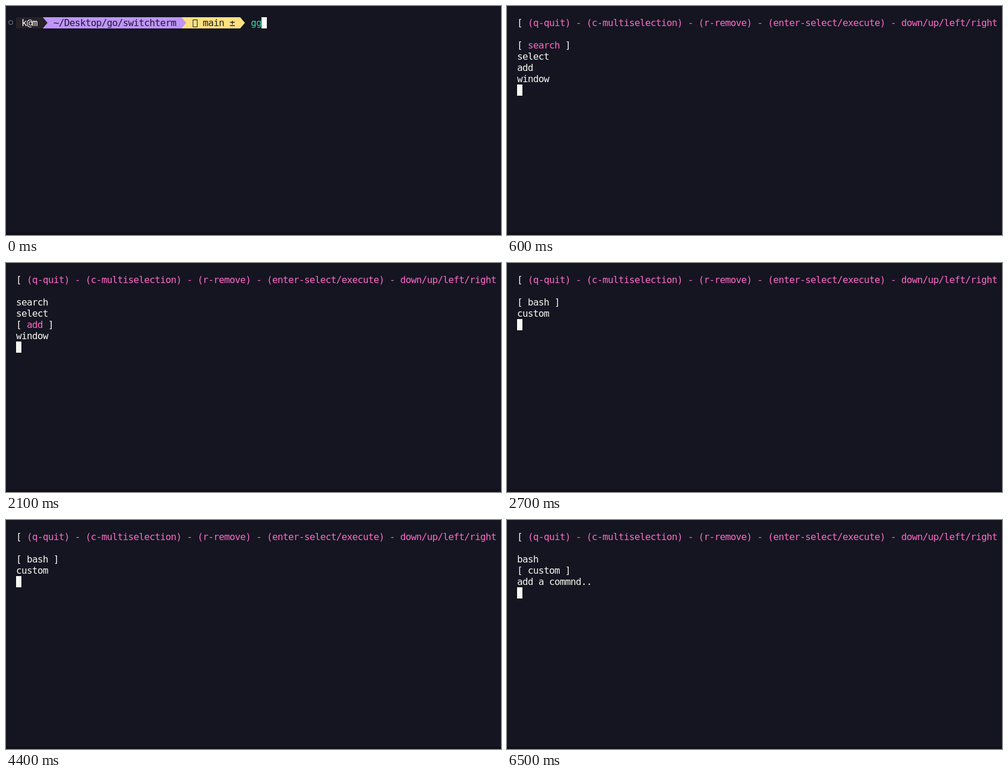
An HTML page with a canvas that plays this animation: 835x388 px, repeating every 8 s.

```html
<!DOCTYPE html>
<html lang="en">
<head>
<meta charset="utf-8">
<title>Terminal menu</title>
<style>
html, body { margin: 0; height: 100%; overflow: hidden; background: #141521; }
canvas { display: block; }
</style>
</head>
<body>
<canvas id="stage" width="835" height="388"></canvas>
<script>
const ctx = document.getElementById('stage').getContext('2d');
const LOOP = 8000, LEFT = 17, TOP = 19, CELL = 9, LINE = 19;
const BG = '#141521', EDGE = '#110f1a', WHITE = '#f8f8f2', PINK = '#ff69c8';
const DARK = '#262228', PURPLE = '#bf95f9', YELLOW = '#ffe080', TEAL = '#35d6a6', INK = '#1d1b2b';
const HELP = '(q-quit) - (c-multiselection) - (r-remove) - (enter-select/execute) - down/up/left/right';
const MAIN = ['search', 'select', 'add', 'window'], SHELL = ['bash', 'custom'];

const x = col => LEFT + col * CELL;
const y = row => TOP + row * LINE;

function rect(color, left, top, width, height) {
  ctx.fillStyle = color;
  ctx.fillRect(left, top, width, height);
}

// Terminal text: one glyph per grid cell
function print(text, col, row, color) {
  ctx.fillStyle = color;
  [...text].forEach((ch, i) => ctx.fillText(ch, x(col + i), y(row) + 15));
}

const cursor = (col, row, color = WHITE) => rect(color, x(col), y(row), CELL, LINE);

// Prompt segment ending in an arrow tip
function segment(color, from, to) {
  const right = x(to);
  rect(color, x(from), TOP, right - x(from), LINE);
  ctx.beginPath();
  ctx.moveTo(right, TOP);
  ctx.lineTo(right + 8, TOP + LINE / 2);
  ctx.lineTo(right, TOP + LINE);
  ctx.fill();
}

function prompt(entered) {
  ctx.lineWidth = 1.4;
  ctx.strokeStyle = '#62636c';
  ctx.beginPath();
  ctx.arc(8, 28, 3.4, 0, Math.PI * 2);
  ctx.stroke();

  segment(YELLOW, 31, 42);
  segment(PURPLE, 5, 31);
  segment(DARK, 0, 5);
  print('k@m', 1, 0, WHITE);
  print('~/Desktop/go/switchterm', 7, 0, INK);
  ctx.lineWidth = 1;
  ctx.strokeStyle = INK;
  ctx.strokeRect(315.5, 23.5, 7, 12);
  print('main ±', 35, 0, INK);
  print('gg', 44, 0, TEAL);
  if (entered) cursor(0, 1);
  else cursor(46, 0, '#ffffff');
}

function menu(items, active, color, message) {
  print('[', 0, 0, WHITE);
  print(HELP, 2, 0, PINK);
  items.forEach((item, i) => {
    const row = i + 2;
    if (i === active) {
      print('[', 0, row, WHITE);
      print(item, 2, row, color);
      print(']', item.length + 3, row, WHITE);
    } else {
      print(item, 0, row, WHITE);
    }
  });
  let end = items.length + 2;
  if (message) print(message, 0, end++, WHITE);
  cursor(0, end);
}

const mainMenu = active => () => menu(MAIN, active, PINK);
const shellMenu = (active, message) => () => menu(SHELL, active, WHITE, message);

const scenes = [
  [0, () => prompt(false)],
  [300, () => prompt(true)],
  [600, mainMenu(0)],
  [1800, mainMenu(1)],
  [2100, mainMenu(2)],
  [2700, shellMenu(0)],
  [3600, shellMenu(1)],
  [4400, shellMenu(0)],
  [6100, shellMenu(1)],
  [6500, shellMenu(1, 'add a commnd..')]
];

const start = performance.now();
function frame() {
  const time = (performance.now() - start) % LOOP;
  rect(BG, 0, 0, 835, 388);
  rect(EDGE, 0, 384, 835, 4);
  ctx.font = '16px "DejaVu Sans Mono", monospace';
  scenes.findLast(([at]) => at <= time)[1]();
  requestAnimationFrame(frame);
}
frame();
</script>
</body>
</html>
```
